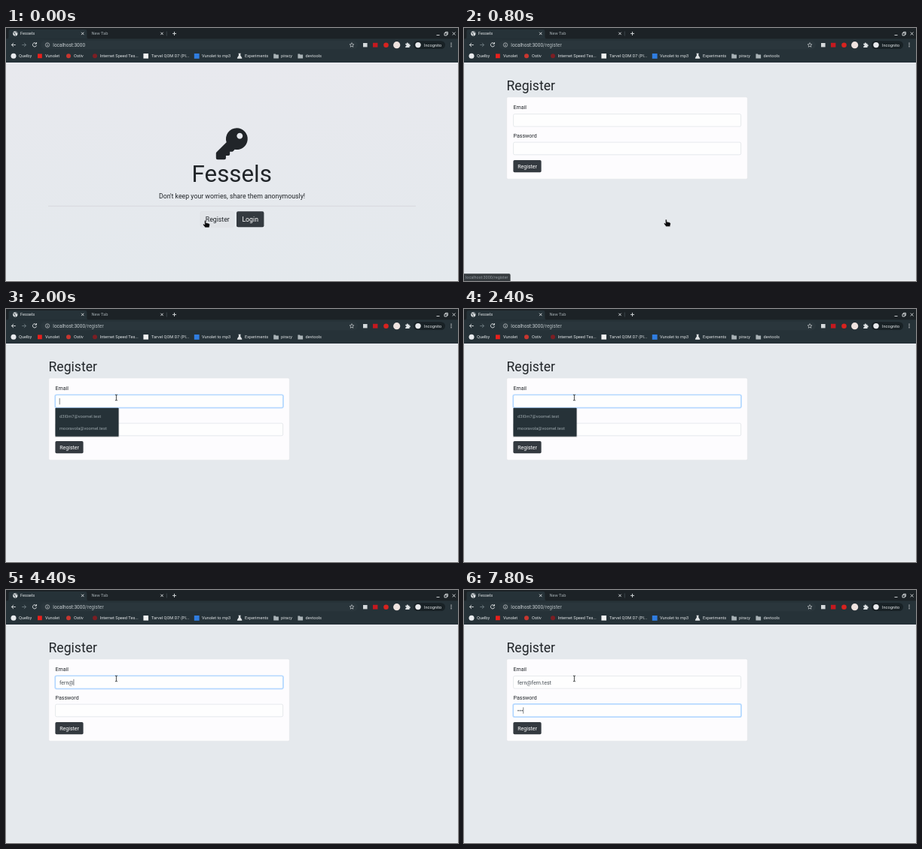
An HTML page for the animation above (8000 ms loop, 600 by 337 pixels).

```html
<!DOCTYPE html>
<html lang="en">
<head>
<meta charset="utf-8">
<title>Register</title>
<style>
  html, body { margin: 0; width: 100%; height: 100%; overflow: hidden; background: #e5e9ed; }
  svg { display: block; width: 100vw; height: 100vh; }
  text { font-family: Roboto, "Open Sans", sans-serif; white-space: pre; }
  .line { fill: none; stroke: #dfe3e5; stroke-width: .9; }
</style>
</head>
<body>
<svg id="stage" viewBox="0 0 600 337" preserveAspectRatio="none">
  <defs>
    <linearGradient id="sky" x1="0" y1="0" x2="0" y2="1">
      <stop offset="0" stop-color="#e8e9ee"/>
      <stop offset="1" stop-color="#e4e9ed"/>
    </linearGradient>
  </defs>
  <rect y="45" width="600" height="292" fill="#e5e9ed"/>

  <g id="home">
    <rect y="45" width="600" height="292" fill="url(#sky)"/>
    <g transform="translate(278.8 133.2) scale(.082)">
      <path fill="#212529" fill-rule="evenodd" d="M336 0a176 176 0 1 1-33 349l-24 27q-8 8-18 8h-37v40q0 24-24 24h-40v40q0 24-24 24H24q-24 0-24-24v-78q0-10 7-17l162-162A176 176 0 0 1 336 0zM384 80a48 48 0 1 0 .1 0z"/>
    </g>
    <path d="M56 237.2H544" stroke="#d3d5da" stroke-width=".8"/>
  </g>

  <g id="form">
    <rect x="56.7" y="92" width="319.6" height="109.2" rx="1.7" fill="#fdfcfe" stroke="#dfe1e5" stroke-width=".5"/>
  </g>

  <g id="popup">
    <rect x="65" y="132" width="85.2" height="39" rx="1" fill="#000" opacity=".18"/>
    <rect x="65.5" y="131.8" width="84" height="38" rx=".8" fill="#263238"/>
  </g>

  <path d="M0 336.6H600" stroke="#f6f7f9" stroke-width=".8"/>
  <g id="status">
    <path d="M0 327.3H60q1.6 0 1.6 1.6V337H0z" fill="#363b3f"/>
  </g>

  <g id="chrome">
    <rect y="46" width="600" height="1" fill="#ebecf3"/>
    <rect width="600" height="46" fill="#263238"/>
    <rect width="600" height="14.3" fill="#1c2226"/>
    <path d="M1 14.3q2.5 0 2.5-2.5V4.4q0-2.4 2.4-2.4H105q2.4 0 2.4 2.4v7.4q0 2.5 2.5 2.5z" fill="#263238"/>
    <rect x="46" y="17" width="421" height="11.2" rx="5.6" fill="#2a363c"/>
    <circle cx="12.3" cy="7.4" r="3.1" fill="#dfe3e5"/>
    <path d="M9.7 6.2l2.3.6-.4 1.5 1 .8-.8 1M13 4.6l.3 1.2 1.7.3" fill="none" stroke="#263238" stroke-width=".8"/>
    <path d="M213.3 4.5v6" stroke="#59656b" stroke-width=".5"/>
    <path class="line" d="M100 5.7l3.4 3.4m0-3.4l-3.4 3.4M205.3 5.7l3.4 3.4m0-3.4l-3.4 3.4M221 7.4h5M223.5 4.9v5M571.5 9.5h4M592.7 5.6l3.8 3.8m0-3.8l-3.8 3.8"/>
    <path class="line" d="M582 6.7h3.2v3.2H582zM583.3 6.5V5.3h3.1v3.2h-1"/>
    <path class="line" d="M12.8 22.5H7.4M10 19.9l-2.6 2.6 2.6 2.6"/>
    <path class="line" style="stroke:#6f7c82" d="M21.2 22.5h5.4M24 19.9l2.6 2.6-2.6 2.6"/>
    <path class="line" d="M40 20.7A2.6 2.6 0 1 0 40.5 23M40.5 19v2.2h-2.2"/>
    <circle class="line" cx="55" cy="22.5" r="2.7" style="stroke-width:.6"/>
    <path class="line" d="M55 22.1v2M55 20.7v.7" style="stroke-width:.7"/>
    <path class="line" style="stroke-width:.6" d="M459 19.6l.8 2 2.1.2-1.6 1.4.5 2.1-1.8-1.1-1.8 1.1.5-2.1-1.6-1.4 2.1-.2z"/>
    <path d="M530.2 20.7h1.7a1 1 0 1 1 1.9 0h1.7v1.7a1 1 0 1 1 0 1.9V26h-5.3v-1.7a1 1 0 1 0 0-1.9z" fill="#dfe3e5"/>
    <rect x="541" y="17.2" width="42" height="10.8" rx="5.4" fill="#182125"/>
    <g fill="#dfe3e5">
      <circle cx="591" cy="20.2" r=".7"/><circle cx="591" cy="22.5" r=".7"/><circle cx="591" cy="24.8" r=".7"/>
      <path d="M308.5 33.8h3.2v.8h-.4v1.9l2 3.3q.4.9-.6.9h-5.2q-1 0-.6-.9l2-3.3v-1.9h-.4z"/>
    </g>
  </g>

  <path id="hand" fill="#0b0b0d" stroke="#f4f4f6" stroke-width=".4" stroke-linejoin="round" d="M-.9.6q.9-1.3 1.8 0L1.2 3.3l1.2-.1.5.5 1.2-.1.5.6 1.1.2q.5.5.3 1.7L5.3 9.4H0L-2.7 5.8q-.3-1.3.9-1.1l1.2.9z"/>
  <path id="arrow" fill="#0b0b0d" stroke="#f4f4f6" stroke-width=".4" d="M0 0v7.6l1.8-1.6 1.2 2.8 1.2-.5L3 5.5h2.4z"/>
  <path id="beam" fill="none" stroke="#15181a" stroke-width=".8" d="M-1.5-3.8q1.5 0 1.5.7 0-.7 1.5-.7M0-3.2v6.4M-1.5 3.8q1.5 0 1.5-.7 0 .7 1.5.7"/>
</svg>
<script>
const NS = "http://www.w3.org/2000/svg";
const $ = id => document.getElementById(id);
const [home, form, popup, status, chrome] = ["home", "form", "popup", "status", "chrome"].map($);
const LOOP = 8000, STEP = 200;
const EMAIL = "fern@fern.test";

function add(parent, tag, attrs) {
  const el = document.createElementNS(NS, tag);
  for (const k in attrs) el.setAttribute(k, attrs[k]);
  return parent.appendChild(el);
}
function label(parent, x, y, size, fill, str, anchor = "start") {
  const el = add(parent, "text", { x, y, "font-size": size, fill, "text-anchor": anchor });
  el.textContent = str;
  return el;
}
function dot(parent, cx, cy, r, fill) {
  return add(parent, "circle", { cx, cy, r, fill });
}
function box(parent, x, y, width, height, rx, fill, stroke = "none") {
  return add(parent, "rect", { x, y, width, height, rx, fill, stroke, "stroke-width": .5 });
}
const show = (el, on) => el.setAttribute("visibility", on ? "visible" : "hidden");
const place = (el, x, y) => el.setAttribute("transform", `translate(${x} ${y})`);

// Browser frame
const PALE = "#dfe3e5";
label(chrome, 19, 9.4, 5.65, PALE, "Fessels");
label(chrome, 113.5, 9.4, 5.65, "#a3acb0", "New Tab");
const host = label(chrome, 62.3, 24.8, 6.5, "#c6cdd0", "localhost:3000");
const path = label(chrome, 0, 24.8, 6.5, "#b2babe", "/register");
label(chrome, 555, 24.6, 5.6, PALE, "Incognito");
dot(chrome, 547, 22.6, 3.7, "#e8eaed");
box(chrome, 474, 20, 5.6, 5.4, 0, "#d5d9db");
box(chrome, 487, 19.8, 6.4, 5.8, 0, "#c5191f");
dot(chrome, 504.5, 22.7, 3.3, "#d8231f");
dot(chrome, 518.7, 22.7, 4.6, "#efe3df");

const bookmarks = [
  [17, "Quelby"], [52, "Vunolet"], [90, "Ostiv"], [124.6, "Internet Speed Tes..."],
  [193, "Tarvel QOM D7 (Pl..."], [260, "Vunolet to mp3"], [317, "Experiments"],
  [365, "piracy"], [397.5, "devtools"]
];
for (const [x, name] of bookmarks) label(chrome, x, 39.2, 5.65, PALE, name);
dot(chrome, 10, 37.2, 3.5, "#e8eaed");
box(chrome, 42, 34.4, 5.8, 5.8, 0, "#e8201c");
dot(chrome, 83, 37.3, 3, "#c8362f");
dot(chrome, 118, 37.3, 3, "#7c1f24");
box(chrome, 182.4, 34, 6.6, 6.6, 0, "#f1f2f2");
box(chrome, 249.8, 34, 6.8, 6.8, 0, "#2f7de0");
for (const x of [355.2, 387.4]) {
  add(chrome, "path", { d: `M${x} 34.6h2.5l.8.9h3.4v4.9H${x}z`, fill: "#aab3b7" });
}

// Landing page
const INK = "#212529", DARK = "#343a40";
label(home, 299.7, 204.8, 31.3, INK, "Fessels", "middle");
label(home, 300, 226.6, 8.75, INK, "Don't keep your worries, share them anonymously!", "middle");
box(home, 258, 244.3, 44.4, 21, 2.1, "#e1e4e8", "#dadde2");
label(home, 280.8, 258, 8.75, INK, "Register", "middle");
box(home, 306, 244.3, 36.4, 21, 2.1, DARK);
label(home, 324.2, 258, 8.75, "#fff", "Login", "middle");

// Register form
label(form, 56.5, 83.2, 17.6, INK, "Register");
label(form, 65.5, 108, 7.05, INK, "Email");
label(form, 65.5, 145.6, 7.05, INK, "Password");
box(form, 65.4, 176, 37.2, 16.3, 1.7, DARK);
label(form, 84.1, 186.5, 7.05, "#fff", "Register", "middle");

function field(y) {
  const glow = box(form, 64.3, y - 1.2, 304.6, 19, 2.8, "#bfdeff");
  const edge = box(form, 65.6, y, 302, 16.6, 1.7, "#fefefe", "#ced4da");
  return amount => {
    glow.setAttribute("opacity", amount);
    edge.setAttribute("stroke", amount > .3 ? "#80bdff" : "#ced4da");
  };
}
const focusEmail = field(114.6), focusPass = field(152.2);
const typed = label(form, 70.9, 125.5, 7.05, "#495057", "");
const bullets = [0, 1, 2].map(i => dot(form, 72 + 2.55 * i, 160.6, .85, "#495057"));
const caret = add(form, "path", { d: "M0-4.2V4.2", stroke: "#2c3136", "stroke-width": .6 });

label(popup, 71, 145, 5.8, "#9aa5aa", "d3l0m7@voomel.test");
label(popup, 71, 160.8, 5.8, "#9aa5aa", "mooravola@voomel.test");
label(status, 2, 333.8, 5.45, "#8f979c", "localhost:3000/register");

// Each track is a list of [start time, value]; a value holds until the next one.
function at(track, t) {
  let value = track[0][1];
  for (const [start, v] of track) if (t >= start) value = v;
  return value;
}
const letters = [[0, 0], [2600, 1], [2800, 2], [3000, 4], [3200, 5], [5000, 6], [5200, 8], [5400, 9], [6000, 10], [6200, 12], [6400, 14]];
const hidden = [[0, 0], [2200, 1], [2600, 0], [3600, 1], [4400, 0]];
const emailGlow = [[0, 0], [1600, .6], [1800, 1], [6800, .3], [7000, 0]];
const passGlow = [[0, 0], [6800, .6], [7000, 1]];
const pass = [[0, 0], [7200, 1], [7400, 2], [7600, 3]];
const pointer = [
  [0, ["hand", 264.4, 256.4]], [200, ["hand", 268.2, 255]],
  [1000, ["arrow", 236, 222]], [1200, ["arrow", 178, 176]], [1400, ["beam", 146.4, 118]]
];

function draw(ms) {
  const t = Math.floor(ms / STEP) * STEP;
  const onForm = t >= 400;
  show(home, !onForm);
  show(form, onForm);
  show(path, onForm);
  path.setAttribute("x", 62.3 + host.getComputedTextLength());
  show(status, t >= 200 && t < 1000);
  show(popup, t >= 1800 && t < 2600);
  focusEmail(at(emailGlow, t));
  focusPass(at(passGlow, t));

  typed.textContent = EMAIL.slice(0, at(letters, t));
  const count = at(pass, t);
  bullets.forEach((b, i) => show(b, onForm && i < count));
  show(caret, t >= 1600 && !at(hidden, t));
  if (t >= 6800) place(caret, 71.1 + 2.55 * count, 160.5);
  else place(caret, 71.2 + (typed.textContent ? typed.getComputedTextLength() : 0), 123);

  const [kind, x, y] = at(pointer, t);
  for (const id of ["hand", "arrow", "beam"]) show($(id), id === kind);
  place($(kind), x, y);
}

const begin = performance.now();
function frame() {
  draw((performance.now() - begin) % LOOP);
  requestAnimationFrame(frame);
}
frame();
</script>
</body>
</html>
```
